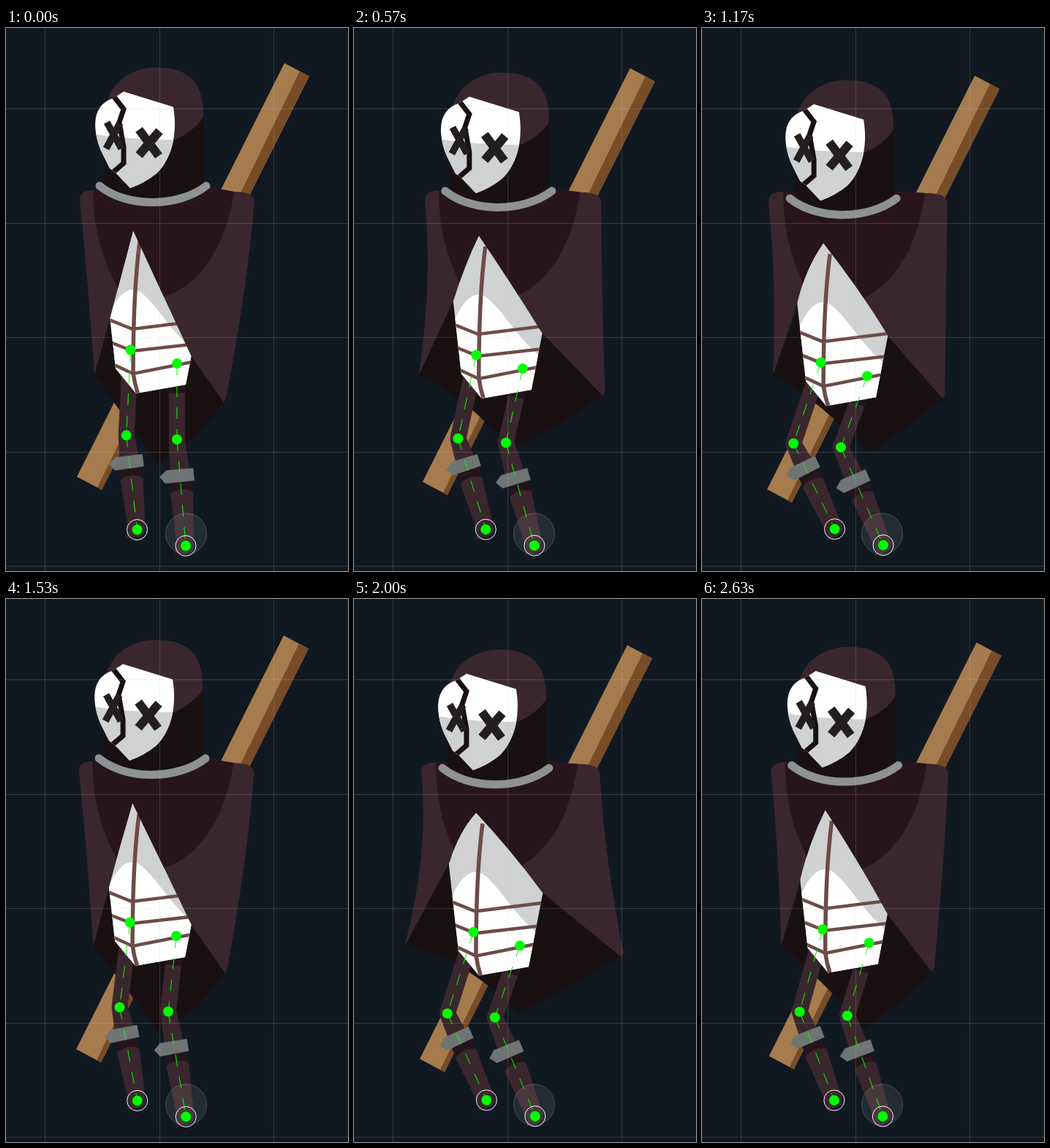
Recreate the animation shown at these times as an HTML page with a canvas. Size 468x743 px, loop 2.67 s.

```html
<!DOCTYPE html>
<html lang="en">
<head>
<meta charset="utf-8">
<title>Hooded puppet</title>
<style>
html, body { margin: 0; height: 100%; overflow: hidden; background: #101922; }
canvas { display: block; }
</style>
</head>
<body>
<canvas id="stage" width="468" height="743"></canvas>
<script>
const ctx = document.getElementById('stage').getContext('2d');
const LOOP = 2670, START = 270, PERIOD = 1295;
const MAROON = '#3a272d', BLACK = '#191012', DARK = '#23151a', SHADE = '#cfd1d2', STRAP = '#6d4b47';

const clamp = x => Math.min(1, Math.max(0, x));
const ramp = (from, to, x) => clamp((x - from) / (to - from));
const smooth = (from, to, x) => { const r = ramp(from, to, x); return r * r * (3 - 2 * r); };
const mix = (a, b, r) => a + (b - a) * r;

// The body sinks smoothly, then speeds up on its way back; the cape flares on the fall
function poseAt(t) {
  const u = (Math.max(t, START) - START) % PERIOD / PERIOD;
  const drop = 21 * (smooth(.085, .467, u) - ramp(.467, 1, u) ** 2);
  const flare = u < .38 ? smooth(.04, .38, u) : (1 - ramp(.38, 1, u)) ** 1.15;
  return { drop, sway: -.46 * drop, flare, spread: flare ** .75 };
}

const path = d => new Path2D(d);
function fill(d, color) { ctx.fillStyle = color; ctx.fill(path(d)); }
function stroke(d, color, width) {
  ctx.strokeStyle = color;
  ctx.lineWidth = width;
  ctx.stroke(path(d));
}
function circle(x, y, r, fillColor, strokeColor) {
  ctx.beginPath();
  ctx.arc(x, y, r, 0, 7);
  if (fillColor) { ctx.fillStyle = fillColor; ctx.fill(); }
  if (strokeColor) { ctx.strokeStyle = strokeColor; ctx.lineWidth = 1; ctx.stroke(); }
}
function group(x, y, draw, clip) {
  ctx.save();
  if (clip) ctx.clip(path(clip));
  ctx.translate(x, y);
  draw();
  ctx.restore();
}

// Two-bone IK; the knee bends to the left
function solveLeg(hx, hy, fx, fy, thigh, shin, cuff, { drop, sway }) {
  const hip = [hx + sway, hy + drop];
  const foot = [fx + .12 * drop, fy - .05 * drop];
  const dx = foot[0] - hip[0], dy = foot[1] - hip[1], dist = Math.hypot(dx, dy);
  const cos = (thigh * thigh + dist * dist - shin * shin) / (2 * thigh * dist);
  const angle = Math.atan2(dy, dx) + Math.acos(Math.min(1, cos));
  const knee = [hip[0] + thigh * Math.cos(angle), hip[1] + thigh * Math.sin(angle)];
  return { hip, knee, foot, shin, cuff };
}

function drawLeg({ hip, knee, foot, shin, cuff }, shadow) {
  ctx.lineCap = 'round';
  stroke(`M${hip}L${knee}`, MAROON, 22);
  ctx.lineCap = 'butt';
  if (shadow) stroke(`M${hip}L${hip.map((v, i) => mix(v, knee[i], .39))}`, DARK, 23);
  ctx.save();
  ctx.translate(...knee);
  ctx.rotate(Math.atan2(foot[1] - knee[1], foot[0] - knee[0]) - Math.PI / 2);
  fill(`M-11 0H11L14 ${cuff + 8}H-13Z`, MAROON);
  fill(`M-14 ${cuff + 12}H15V${cuff + 34}H-14Z`, DARK);
  fill(`M-15 ${cuff + 32}Q0 ${cuff + 23} 16 ${cuff + 32}L11 ${shin + 3}Q9 ${shin + 11} -2 ${shin + 10}
    L-16 ${shin + 9}L-12 ${shin}Z`, MAROON);
  fill(`M-28 ${cuff + 8}L-18 ${cuff}H19V${cuff + 17}L-21 ${cuff + 18}Z`, '#6f7475');
  ctx.restore();
}

function drawStaff() {
  fill('M381 48L415 66L131 632L97 614Z', '#a67c4e');
  fill('M402 59L415 66L131 632L125 629Z', '#774c27');
}

function drawTorso() {
  const torso = 'M174 277L154 300L136 340L150 466L178 500L246 488L266 384L200 302Z';
  fill(torso, SHADE);
  group(0, 0, () => {
    fill('M130 425C144 372 165 348 185 362C208 380 222 412 262 446V510H130Z', '#fff');
    stroke('M183 292C176 345 174 415 174 472Q176 487 181 502', STRAP, 5.5);
    stroke('M136 397L173 412L270 400M138 428L173 442L270 431M146 460L174 473L270 454', STRAP, 4.5);
  }, torso);
}

function drawHead() {
  fill('M135 160V222Q200 256 271 218V110L180 95Z', BLACK);
  fill('M138 101C148 68 178 54 205 54C252 54 271 76 270 122C262 135 246 147 228 154L160 130Z', MAROON);
  const mask = `M147 96L161 87L229 108C236 150 224 182 206 199Q190 212 170 219
    L150 198L142 192L130 168C118 138 117 105 147 96Z`;
  fill(mask, '#fff');
  group(0, 0, () => {
    fill('M110 143Q160 153 240 153V230H110Z', SHADE);
    stroke('M144 89L161 111L155 129L161 163L161 185L140 203', BLACK, 7);
  }, mask);
  stroke('M138 129L158 165M156 130L137 165', '#231f20', 9.5);
  stroke('M182 139L209 175M210 141L182 174', '#231f20', 12);
  ctx.lineCap = 'round';
  stroke('M128 216C165 246 235 246 274 216', '#8f9293', 11);
  ctx.lineCap = 'butt';
}

// The corners of the cape follow from how far it flares and how deep the body sinks
function capeCorners({ drop, sway, flare, spread }) {
  return {
    apex: [174 + sway, 277 + drop],
    hemL: [mix(121, 67, flare), 475],
    hemR: [mix(298, 369, flare), 512 - 24 * flare ** 2],
    tip: [208 + 1.2 * drop, mix(596, 566, flare)],
    fold: [mix(263, 304, spread), mix(555, 524, flare)],
    knotL: [141 - .65 * drop, mix(402, 358, spread)],
    knotR: [mix(254, 258, flare), mix(450, 400, spread)]
  };
}

// A quadratic curve whose control point lies off the middle of the chord
function bow(a, b, x, y) {
  return `Q${(a[0] + b[0]) / 2 + x} ${(a[1] + b[1]) / 2 + y} ${b}`;
}

function drawLining({ apex, hemL, hemR, tip, fold }, { spread }) {
  fill(`M${hemL}${bow(hemL, tip, 0, -34 * spread)}L${fold}L${hemR}L${apex}Z`, BLACK);
}

function drawCape({ apex, hemL, hemR, knotL, knotR }, { drop, sway }) {
  const left = 101 - .58 * drop, right = 340 - .25 * drop, top = 222 + .12 * drop;
  const cape = `M${hemL}Q${left + 11} 345 ${left} ${top + 14}Q${left} ${top} ${left + 18} ${top}
    H${130 + sway}L${275 + sway} ${217 + .4 * drop}
    L${right - 28} ${top + 2}Q${right} ${top + 2} ${right} ${top + 16}
    Q${mix(right, hemR[0], .25)} 360 ${hemR[0] + 3} ${hemR[1] - 6}L${hemR}L${knotR}
    ${bow(knotR, apex, .2 * drop, -.2 * drop)}${bow(apex, knotL, -.4 * drop, -.4 * drop)}Z`;
  fill(cape, MAROON);
  group(-.45 * drop, .4 * drop, () => fill(
    'M119 200V222C120 278 132 325 165 376L213 369C266 353 300 300 312 226V200Z', '#28141d'), cape);
}

function drawGrid() {
  let lines = '';
  for (let x = 53.5; x < 468; x += 156.5) lines += `M${Math.floor(x) + .5} 0V743`;
  for (let y = 110.5; y < 743; y += 156.5) lines += `M0 ${Math.floor(y) + .5}H468`;
  stroke(lines, 'rgba(190,195,200,.2)', 1);
}

function drawControls(legs) {
  circle(246.5, 692, 28, 'rgba(255,255,255,.08)', 'rgba(255,255,255,.2)');
  for (const { hip, knee, foot } of legs) {
    ctx.setLineDash([16, 14]);
    stroke(`M${hip}L${knee}M${knee}L${foot}`, '#0f0', 1);
    ctx.setLineDash([]);
    circle(...foot, 14, null, '#fff');
    for (const joint of [hip, knee, foot]) circle(...joint, 7, '#0f0');
  }
}

function draw(t) {
  const pose = poseAt(t), { drop, sway } = pose, corners = capeCorners(pose);
  const legs = [
    solveLeg(170.5, 440.5, 179.5, 686.5, 117, 130, 28, pose),
    solveLeg(234, 459, 246, 708.5, 104, 146, 41, pose)
  ];
  ctx.fillStyle = '#101922';
  ctx.fillRect(0, 0, 468, 743);
  group(sway, drop, drawStaff);
  drawLining(corners, pose);
  drawLeg(legs[0]);
  drawLeg(legs[1], true);
  group(sway, drop, drawTorso);
  drawCape(corners, pose);
  group(sway, drop, drawHead);
  drawGrid();
  drawControls(legs);
}

const begin = performance.now();
function tick() {
  draw((performance.now() - begin) % LOOP);
  requestAnimationFrame(tick);
}
tick();
</script>
</body>
</html>
```
